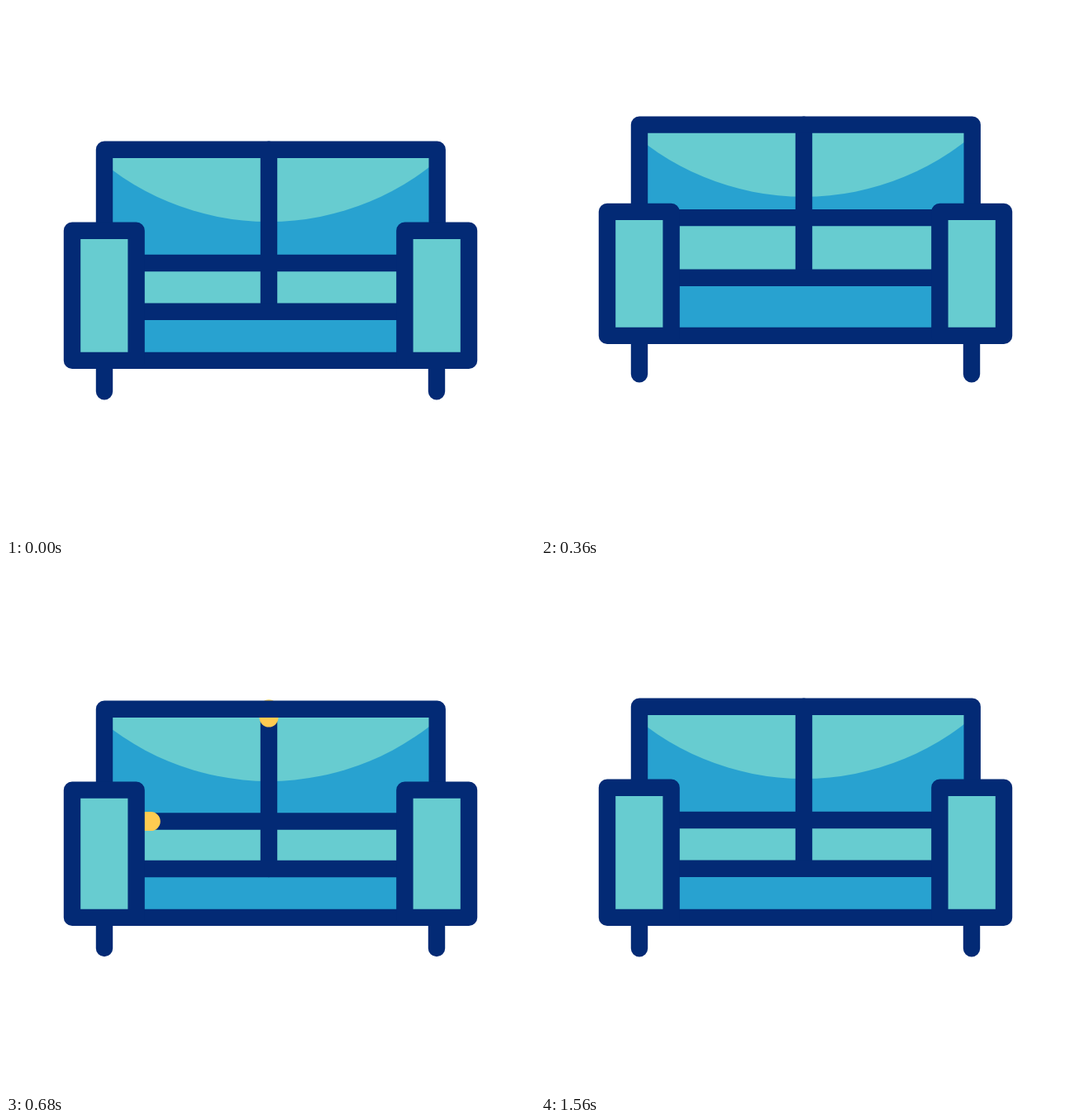
An HTML page for the animation above (2000 ms loop, 640 by 640 pixels).

```html
<!DOCTYPE html>
<html lang="en">
<head>
<meta charset="utf-8">
<title>Sofa</title>
<style>
  html, body { margin: 0; width: 100%; height: 100%; overflow: hidden; background: #fff; }
  svg { display: block; width: 100vw; height: 100vh; }
  .line { fill: none; stroke: #032a75; stroke-width: 20.4; stroke-linecap: round; stroke-linejoin: round; }
  .glow { stroke: #ffcb51; stroke-width: 23; }
  .blue { fill: #28a2d0; }
  .mint { fill: #67ccd0; }
  .arm { fill: #67ccd0; }
</style>
</head>
<body>
<svg viewBox="0 0 640 640">
  <clipPath id="backClip"><path id="backArea"/></clipPath>
  <path id="back" class="blue"/>
  <g clip-path="url(#backClip)"><circle id="shade" class="mint" cx="318" r="318"/></g>
  <path id="cushion" class="mint"/>
  <path id="base" class="blue"/>
  <path id="seams" class="line"/>
  <path id="glow" class="line glow"/>
  <path id="frame" class="line"/>
  <path id="arms" class="line arm"/>
</svg>
<script>
  const LOOP = 2000, STEP = 40;
  const KEYS = [120, 320, 520, 720];

  // Height of each part at rest, and its shift when stretched and when squashed
  const PARTS = {
    top:    [173.8, -37, 28.5],
    arm:    [271.8, -28.8, 27.4],
    seam:   [311, -63, 15],
    seat:   [369.8, -46, 2],
    bottom: [428.9, -33.5, 0],
    foot:   [466.3, -23.3, -1.5]
  };
  const LEFT = 119, RIGHT = 521.7, MID = 318;
  const SEAM_A = 158, SEAM_B = 482;

  const mix = (a, b, k) => a + (b - a) * k;
  const ease = (t, from, to) => {
    const s = Math.min(1, Math.max(0, (t - from) / (to - from)));
    return s * s * (3 - 2 * s);
  };
  const box = (x1, y1, x2, y2) => `M${x1} ${y1}H${x2}V${y2}H${x1}Z`;
  const set = (id, value, attr = 'd') => document.getElementById(id).setAttribute(attr, value);

  function pose(t) {
    const y = {};
    for (const [name, [rest, up, down]] of Object.entries(PARTS)) {
      const shifts = [0, up, down, 0];
      let shift = 0;
      for (let i = 0; i < 3; i++) {
        if (t >= KEYS[i]) shift = mix(shifts[i], shifts[i + 1], ease(t, KEYS[i], KEYS[i + 1]));
      }
      y[name] = rest + shift;
    }
    return y;
  }

  function draw(t) {
    const y = pose(t);
    const backBox = box(LEFT, y.top, RIGHT, y.seam);
    set('back', backBox);
    set('backArea', backBox);
    set('shade', y.top - 230.8, 'cy');
    set('cushion', box(SEAM_A, y.seam, SEAM_B, y.seat));
    set('base', box(SEAM_A, y.seat, SEAM_B, y.bottom));
    set('seams', `M${MID} ${y.top}V${y.seat}M${SEAM_A} ${y.seam}H${SEAM_B}`);

    const tip = ease(t, 596, 1196), tail = ease(t, 920, 1560);
    const down = k => mix(y.top, y.seat, k), across = k => mix(SEAM_A, SEAM_B, k);
    set('glow', tip > 0 && tail < 1
      ? `M${MID} ${down(tail)}V${down(tip)}M${across(tail)} ${y.seam}H${across(tip)}`
      : '');

    set('frame', `M${LEFT} ${y.arm}V${y.top}H${RIGHT}V${y.arm}` +
      `M${SEAM_A} ${y.seat}H${SEAM_B}M${SEAM_A} ${y.bottom}H${SEAM_B}` +
      `M${LEFT} ${y.bottom}V${y.foot}M521 ${y.bottom}V${y.foot}`);
    set('arms', box(80, y.arm, 157.6, y.bottom) + box(482.4, y.arm, 560, y.bottom));
  }

  const start = performance.now();
  function tick() {
    const t = (performance.now() - start) % LOOP;
    draw(Math.floor(t / STEP) * STEP);
    requestAnimationFrame(tick);
  }
  tick();
</script>
</body>
</html>
```
